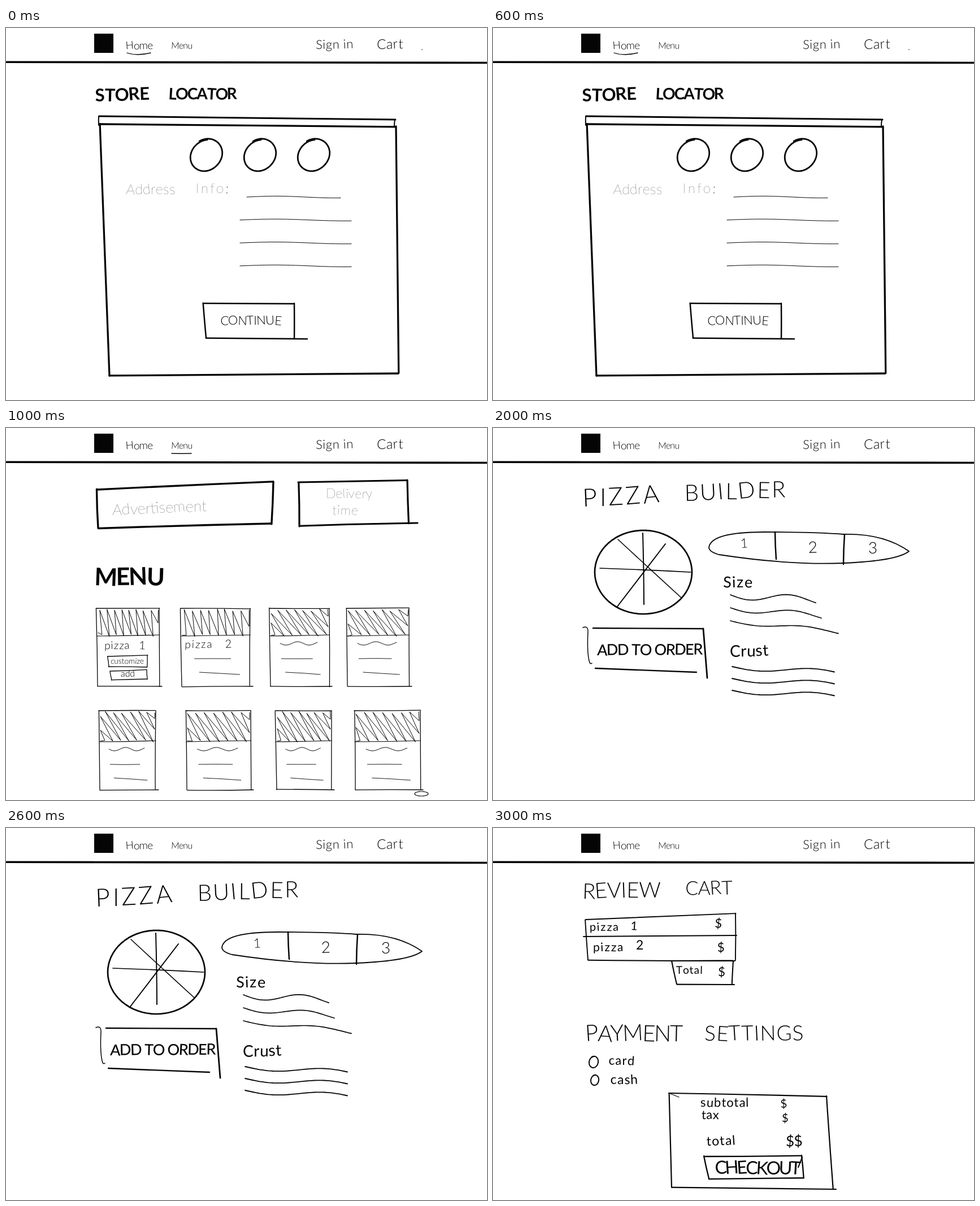
An HTML page that plays this animation: 851 by 658 pixels, repeating every 4 s.

```html
<!DOCTYPE html>
<html lang="en">
<head>
<meta charset="utf-8">
<title>Pizza shop wireframes</title>
<style>
html, body { margin: 0; width: 100%; height: 100%; overflow: hidden; background: #fff; }
svg { display: block; width: 851px; height: 658px; }
path { fill: none; stroke: #050505; stroke-linecap: round; stroke-linejoin: round; }
text { fill: #050505; font-family: Lato, "Open Sans", sans-serif; font-kerning: none; }
</style>
</head>
<body>
<svg id="stage" viewBox="0 0 851 658"></svg>
<script>
const STEP = 1000;
const svg = document.getElementById('stage');
let layer, seed = 7;

// Seeded value between -1 and 1.
function wobble() {
  seed = (seed * 16807) % 2147483647;
  return seed / 1073741823.5 - 1;
}

function add(parent, tag, attrs, text = '') {
  const el = document.createElementNS('http://www.w3.org/2000/svg', tag);
  for (const k in attrs) el.setAttribute(k, attrs[k]);
  el.textContent = text;
  parent.append(el);
  return el;
}

const newLayer = () => layer = add(svg, 'g', {});
const pen = (width, d) => add(layer, 'path', { d, 'stroke-width': width });

// A hand-drawn straight stroke with a slight bow.
function line(width, x0, y0, x1, y1) {
  const mx = (x0 + x1) / 2 + wobble(), my = (y0 + y1) / 2 + wobble();
  pen(width, `M${x0} ${y0}Q${mx} ${my} ${x1} ${y1}`);
}

// Four loose strokes through corners [x, y]; tail lengthens the bottom one.
function quad(width, corners, tail = 0) {
  corners.forEach(([x0, y0], i) => {
    const [x1, y1] = corners[(i + 1) % 4];
    line(width, x0 + (i === 2 ? tail : 0), y0, x1 + wobble(), y1 + wobble());
  });
}

function plot(width, steps, point) {
  const pts = Array.from({ length: steps + 1 }, (_, i) => point(i / steps).map(v => v.toFixed(1)));
  pen(width, 'M' + pts.join('L'));
}

function wave(width, x0, y0, x1, drop, amp, cycles) {
  plot(width, 40, u => [x0 + (x1 - x0) * u, y0 + drop * u + amp * Math.sin(u * cycles * 2 * Math.PI)]);
}

// Egg-like loop whose ends overlap by a short stretch.
function loop(width, cx, cy, rx, ry, egg = 0) {
  plot(width, 70, u => {
    const a = -1.5 - u * 6.8;
    const r = 1 + egg * Math.cos(2 * a + 1.57) + egg * (u - 0.5);
    return [cx + rx * r * Math.cos(a), cy + ry * r * Math.sin(a)];
  });
}

// Pen lettering: each letter gets a small random tilt.
function write(text, x, y, size, weight = 300, spacing = 0, angle = 0) {
  add(layer, 'text', {
    x, y, 'font-size': size, 'font-weight': weight, 'letter-spacing': spacing,
    rotate: Array.from(text, () => (wobble() * 4).toFixed(1)).join(' '),
    transform: `rotate(${angle} ${x} ${y})`
  }, text);
}

// Slanted zigzag cut off by the sides of its box.
function hatch(x, y, w, h, lean, turns) {
  plot(1, turns * 2, u => {
    const i = Math.round(u * turns * 2), s = u * (w + lean) + wobble();
    const low = i % 2;
    const at = low ? Math.min(s, w) : Math.max(s - lean, 0);
    return [x + at, y + h * (at - s + lean) / lean + wobble() * 2];
  });
}

function card(x, y, w, h, split, lean, notes) {
  const floor = y + split;
  quad(1.3, [[x, y], [x + w, y], [x + w, y + h], [x + 2, y + h]], 5);
  line(1.2, x + 1, floor, x + w, floor - 2);
  hatch(x + 3, y + 3, w - 5, split - 4, lean, 9);
  if (notes > 2) wave(1, x + w * 0.18, floor + 13, x + w * 0.8, 0, 3, 1.6);
  if (notes > 1) {
    line(0.9, x + w * 0.2, floor + 40, x + w * 0.72, floor + 40);
    line(0.9, x + w * 0.27, floor + 64, x + w * 0.85, floor + 68);
  }
}

function header() {
  newLayer();
  pen(3.6, 'M1 60.3L851 61.5');
  add(layer, 'rect', { x: 156, y: 10, width: 34, height: 34, fill: '#050505' });
  write('Home', 212, 37.5, 19, 300, -0.6);
  write('Menu', 292, 36.5, 16, 300, -0.8);
  write('Sign in', 548, 37, 22, 300, 0.6, -1);
  write('Cart', 656, 37, 24, 300, 0.6, -1);
}

function locator() {
  pen(1.3, 'M214 44Q232 50 256 44');
  pen(1.4, 'M736 38L736 38.2');
  write('STORE', 158, 130, 31, 700, -0.5, -2);
  write('LOCATOR', 287, 126, 28, 700, -1.8);
  line(3, 165, 156, 689, 162);
  line(2, 164, 156, 164, 172);
  line(2, 688, 162, 687, 173);
  quad(3.3, [[167, 170], [690, 174], [694, 611], [183, 615]]);
  for (let i = 0; i < 3; i++) loop(2.8, 354 + i * 95, 225, 28, 28, 0.07);
  write('Address', 212, 294, 25, 200, 0.3);
  write('Info:', 336, 292, 24, 200, 3);
  for (let i = 0; i < 4; i++) {
    wave(1, i ? 414 : 426, 299 + i * 40.6, i ? 611 : 592, 0, -1.6, 0.8);
  }
  quad(2.5, [[349, 487], [510, 487], [510, 550], [354, 548]], 23);
  write('CONTINUE', 379, 525, 22, 300, -0.6);
}

function menu() {
  line(1.5, 293, 45, 328, 45);
  quad(3.4, [[161, 109], [473, 95], [469, 169], [163, 177]]);
  quad(3.2, [[517, 96], [710, 92], [713, 168], [519, 174]], 15);
  write('Advertisement', 188, 154, 27, 200, 0, -2.5);
  write('Delivery', 566, 124, 23, 200, 0.2);
  write('time', 577, 153, 23, 200, 1);
  write('MENU', 156, 278, 43, 700, -2);

  const rows = [
    { y: 319, h: 138, split: 49, xs: [160, 309, 466, 602], ws: [111, 123, 106, 111] },
    { y: 500, h: 140, split: 55, xs: [164, 318, 477, 616], ws: [101, 115, 99, 117] }
  ];
  rows.forEach(({ y, h, split, xs, ws }, r) => xs.forEach((x, c) => {
    const plain = !r && c < 2;
    card(x, y, ws[c], h, split, plain ? 10 : 34, plain ? c + 1 : 3);
  }));
  for (let n = 0; n < 2; n++) {
    write('pizza', 174 + n * 142, 391 - n * 2, 19, 300, 1 + n);
    write(String(n + 1), 235 + n * 153, 391 - n * 2, 20);
  }
  quad(1.3, [[180, 404], [250, 402], [249, 423], [182, 422]]);
  quad(1.3, [[184, 430], [249, 428], [250, 444], [187, 446]]);
  write('customize', 185, 417, 14, 300, -0.2);
  write('add', 203, 440, 16);
  loop(1.2, 735, 647, 12, 4);
}

function builder() {
  write('PIZZA', 159, 139, 44, 300, 4.5, -2.6);
  write('BUILDER', 339, 129, 40, 300, 2.6, -2.3);
  loop(2.7, 266, 255, 86, 74);
  line(2, 265, 186, 267, 312);
  line(1.6, 221, 197, 334, 301);
  line(2, 305, 205, 219, 317);
  line(1.6, 189, 248, 350, 255);
  pen(1.8, 'M382 211Q386 184 480 184T620 188Q690 186 736 218Q715 235 620 239T400 224Q382 219 382 211');
  line(2.5, 499, 184, 501, 232);
  line(2.5, 622, 188, 620, 241);
  write('1', 438, 212, 23);
  write('2', 558, 221, 28);
  write('3', 664, 222, 28);
  write('Size', 407, 282, 27, 400, 1.5);
  write('Crust', 419, 405, 28, 400, 0.5, -2);
  for (let i = 0; i < 3; i++) {
    wave(1.7, 420, 295 + i * 23, 571 + i * i * 10, 10 + i * 5, 7 - i * 1.5, 1.1);
    wave(1.8, 423, 422 + i * 21, 604, 11, 5, 0.95);
  }
  pen(1.5, 'M159 353Q168 349 168 360Q166 400 171 415Q173 418 175 416');
  line(2.4, 177, 354, 372, 355);
  line(2.4, 181, 425, 360, 432);
  line(2.8, 372, 355, 379, 442);
  write('ADD TO ORDER', 184, 402, 27, 500, -1.4, -0.5);
}

function cart() {
  write('REVIEW', 158, 125, 38, 300, -0.4, -1.5);
  write('CART', 340, 118, 34, 300, -0.5);
  quad(1.9, [[164, 162], [429, 151], [428, 235], [168, 233]]);
  line(1.9, 160, 192, 431, 190);
  quad(2.1, [[316, 235], [425, 235], [423, 277], [325, 276]], 4);
  for (let n = 0; n < 2; n++) {
    write('pizza', 171 + n * 6, 182 + n * 36, 20 + n, 400, 1.8);
    write(String(n + 1), 243 + n * 10, 180 + n * 35, 21 + n * 2, 400);
    write('$', 392 + n * 5, 176 + n * 43, 22, 400);
  }
  write('Total', 324, 258, 19, 400, 1);
  write('$', 398, 262, 22, 400);
  write('PAYMENT', 164, 377, 40, 300, -2.4);
  write('SETTINGS', 374, 376, 37, 300, 1);
  loop(2, 178, 414, 8, 10, 0.05);
  loop(2, 180, 446, 7, 9, 0.05);
  write('card', 205, 419, 22, 400, 1);
  write('cash', 208, 453, 23, 400, 1);
  line(1.2, 314, 470, 329, 476);
  quad(2.2, [[311, 469], [590, 474], [602, 639], [316, 635]], 5);
  write('subtotal', 367, 493, 22, 400, 1);
  write('tax', 369, 515, 22, 400, 0.5);
  write('$', 509, 495, 20, 400);
  write('$', 511, 520, 20, 400);
  write('total', 378, 562, 23, 400, 1.2, -2);
  write('$$', 518, 563, 26, 400);
  quad(2.3, [[374, 581], [546, 579], [549, 619], [382, 620]]);
  line(2, 547, 582, 540, 600);
  write('CHECKOUT', 393, 612, 32, 400, -3.4);
}

header();
const scenes = [locator, menu, builder, cart].map(draw => {
  const g = newLayer();
  draw();
  return g;
});

const start = performance.now();
function tick() {
  const now = Math.floor((performance.now() - start) / STEP) % scenes.length;
  scenes.forEach((g, i) => { g.style.display = i === now ? '' : 'none'; });
  requestAnimationFrame(tick);
}
tick();
</script>
</body>
</html>
```
